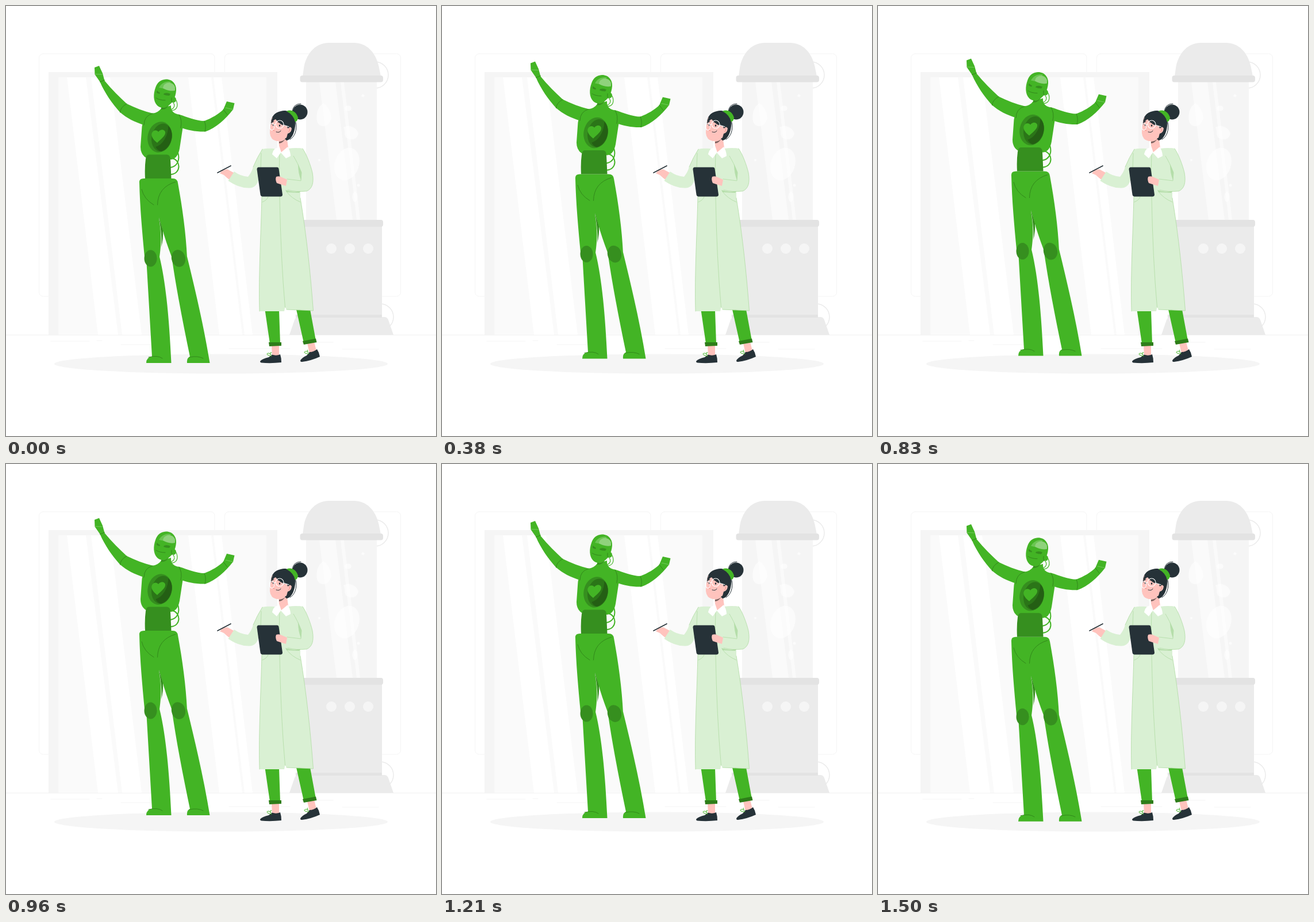
Recreate the animation shown at these times as an HTML page. Size 748 by 748 pixels, loop 1540 ms.

```html
<!DOCTYPE html>
<html lang="en">
<head>
<meta charset="utf-8">
<title>Robot and scientist</title>
<style>
  html, body { margin: 0; height: 100%; overflow: hidden; background: #fff; }
  svg { display: block; width: 100vw; height: 100vh; }
  .green { fill: #43b425; }
  .deep { fill: #368f1f; }
  .coat { fill: #d9f0d3; }
  .skin { fill: #ffc3bd; }
  .ink { fill: #263238; }
  .line { fill: none; stroke-linecap: round; stroke-linejoin: round; }
  .seam { stroke: #32881b; }
  .fold { stroke: #b0dba4; stroke-width: .8; }
  .cable { stroke: #43b425; }
</style>
</head>
<body>
<svg viewBox="0 0 748 748">
  <g id="room">
    <g class="line" stroke="#f5f5f5">
      <rect x="57.5" y="83" width="305.5" height="422" rx="7"/>
      <rect x="380.5" y="83" width="306" height="422" rx="7"/>
      <path d="M78 583H145M158 582H167M200 589H263M388 596H462M478 596H494M530 585H569M585 597H648"/>
    </g>
    <path class="line" stroke="#f0f0f0" d="M0 572.3H748"/>
    <path fill="#f5f5f5" d="M74 115H472V572H74Z"/>
    <path fill="#fafafa" d="M91 124H453V572H91Z"/>
    <path fill="#fff" d="M106 124H139L195 572H160ZM148 124H181L236 572H202ZM317 124H357L411 572H371ZM361 124H375L429 572H415Z"/>
    <ellipse cx="374" cy="622.5" rx="290" ry="17" fill="#f5f5f5"/>
  </g>

  <g id="tank">
    <g class="line" stroke="#ebebeb" stroke-width="1.5">
      <circle cx="642" cy="120" r="23"/>
      <circle cx="651" cy="541" r="23"/>
    </g>
    <path fill="#f5f5f5" d="M522 132H645V372H522Z"/>
    <path fill="#fafafa" d="M545 132H573L603 372H575ZM582 132H588L616 372H610Z"/>
    <g fill="#fff" opacity=".6">
      <path d="M552 169C560 174 568 189 565 198C561 209 551 212 544 206C537 198 540 176 552 169Z"/>
      <ellipse cx="595" cy="178" rx="6" ry="4.5"/>
      <path d="M587 211C598 206 610 211 613 222C611 232 601 235 592 229C587 224 591 217 587 211Z"/>
      <ellipse cx="593" cy="275" rx="21" ry="29" transform="rotate(18 593 275)"/>
      <ellipse cx="607" cy="332" rx="4.5" ry="9"/>
      <circle cx="613" cy="312" r="2.5"/>
      <circle cx="621" cy="156" r="2.5"/>
      <circle cx="545" cy="268" r="2"/>
    </g>
    <path fill="#ebebeb" d="M516 122L518.500 105C524 80 540 64 562 64H605C627 64 643 80 648.500 105L652 122ZM518 383H654V541H518ZM508 541H658Q663 541 665 546L674 572H493L502 546Q504 541 508 541Z"/>
    <g fill="#e3e3e3">
      <rect x="511.5" y="121" width="144.5" height="11.5" rx="4"/>
      <rect x="511.5" y="372" width="144.5" height="12" rx="4"/>
      <path d="M504 537H654V542H504Z"/>
    </g>
    <g fill="#f5f5f5">
      <circle cx="566" cy="422" r="9"/><circle cx="598" cy="422" r="9"/><circle cx="630" cy="422" r="9"/>
    </g>
  </g>

  <g id="robot">
    <path class="line cable" stroke-width="2" d="M290 265C304 269 305 291 287 293M299 255C303 268 298 279 286 281"/>
    <g class="green">
      <path d="M288 435L315 436C330 497 345 562 354.500 621H315Q314 612 320 610C309 557 297 497 288 435Z"/>
      <path d="M244 438L267 436C279 485 284 550 287.500 621H244Q244 611 254 610Z"/>
    </g>
    <path class="green" d="M232 308Q231 300 240 300H290Q298 300 299 308C307 352 313 395 315 438L288 436Q277 407 272 388L266 368C268 384 272 401 267 437L241 436C237 394 233 350 232 308Z"/>
    <path class="deep" d="M266 368L273 390Q274 404 270 420Q272 402 266 368Z"/>
    <ellipse class="deep" cx="251.5" cy="439" rx="11" ry="14.5"/>
    <ellipse class="deep" cx="300" cy="439" rx="12" ry="15" transform="rotate(-14 300 439)"/>
    <path class="line seam" d="M236 319Q240 336 257 346M263.500 346Q264 315 295 306M248 611Q264 607 272 613M319 611Q334 608 343 613"/>

    <path class="green" d="M253 187Q265 186 270 178L287 173Q286 187 302 189Q310 200 307 215L302 248Q299 265 288 267H250Q234 262 234 245L236.500 210Q239 193 253 187Z"/>
    <path class="deep" d="M248 258.500H280Q286 259 286 267L287.500 300H242Q241 281 243 266Q244 259 248 258.500Z"/>

    <path class="green" d="M154 107L162 104L168 117L171.500 130C184 145 197 158 210 170C224 177 240 183 256 187L240 207C224 202 210 195 198.500 185C185 170 172 152 163.500 132L154.500 119Z"/>
    <path class="green" d="M302 189C315 193 331 200 345 200C358 195 370 188 378 180L384 166L397.500 169L395 180C382 197 365 212 347 218.500C331 219 316 216 303 211Z"/>
    <path class="line seam" d="M210 170Q199 176 198.500 185M163.500 132L171.500 129M240 207Q240 191 255 187M345 200Q349 209 346 218M378 180L385 189M301 189Q307 198 304 212"/>
    <path class="line" stroke="#7fcf69" stroke-width=".8" d="M155 118.500L167 119M382 177L395 180"/>

    <g transform="rotate(12 267.5 228)">
      <ellipse class="deep" cx="267.5" cy="228" rx="21" ry="27"/>
      <ellipse cx="271" cy="228" rx="17.5" ry="24.5" fill="#2b7518"/>
      <path fill="#245f14" d="M278 206C292 214 292 242 275 252C270 252 266 249 264 246C276 240 281 222 278 206Z"/>
    </g>
    <path class="green" d="M263 238C254 231 251 224 255 219C258 215 263 216 265 219C269 214 275 214 277 219C278 226 271 230 263 238Z"/>

    <path class="deep" d="M270 176L284 171Q279 181 270 180Z"/>
    <path class="line cable" stroke-width="1.2" d="M296 164C300 173 298 182 287 182M291 168Q296 175 288 180"/>
    <path class="green" d="M278 127.500C289 127 297 136 296 147C295 160 289 169 283 173C277 179 268 178 263 173C256 166 256 153 260 142C263 133 269 128 278 127.500Z"/>
    <ellipse class="green" cx="291.5" cy="163" rx="4.5" ry="5"/>
    <path fill="#6bc553" d="M266 142C270 134 279 130 287 132L276 144Z"/>
    <path fill="#8fd27c" d="M274 139C278 132 290 131 294 141L294 147C287 149 278 146 273 143Z"/>
    <path class="deep" d="M262 147L268 151L267 153L262 151ZM275 152Q281 150 286 153L284 156Q278 156 274 154Z"/>
    <path class="line seam" d="M261 160Q267 164 277 164M288 160Q287 165 289 168"/>
  </g>

  <g id="scientist">
    <path class="skin" d="M462 590H475V609H463ZM524 587L536 584L540 600L528 604Z"/>
    <path class="green" d="M450.500 529H475L477 587H459ZM505 528H529L539 582L518 586Z"/>
    <path fill="#2e7d19" d="M457 585H479V591L458 592ZM516 583L539 578.500L540.500 585L518 589Z"/>
    <path class="ink" d="M442 618Q445 614 457 611L463 606.500Q470 609 477 606Q479 612 479 620Q461 622 444 620.500Q442 620 442 618ZM512 617Q514 612 523 608L528 602Q535 602 541 597Q545 603 546 610Q531 617 515 619Q512 619 512 617Z"/>
    <path class="line cable" d="M462 609Q454 608 454 605Q457 602 461 607Q458 601 462 603M527 605Q519 605 519 602Q522 599 526 603Q522 597 525 599"/>

    <path class="skin" d="M474 230L475 243L479 255L491 247L488 224Z"/>
    <path fill="#7b625f" d="M475 236Q483 235 486 231Q482 238 475 239Z"/>

    <path class="skin" d="M372 291Q376 284 385 284L398 291L391 304Q384 299 379 294Z"/>
    <path class="line" stroke="#263238" stroke-width="1.7" d="M368 290L391 278"/>

    <path class="coat" d="M446 249Q455 247 466 248L478 255L491 248Q505 246 516 248C523 258 530 277 533 290C536 307 533 318 523 322L512 323V334C523 400 530 470 534.500 530L488 528L485.500 524L484 531H441C439 466 444 390 445 331L443 287L440 300Q437 313 428 316Q408 319 386.500 304L397 288Q408 296 421 297Q427 290 430 280Q437 263 446 249Z"/>
    <path fill="#b5deaa" d="M508 275L514 289L513 303Q508 290 508 275ZM486 320Q499 325 512 322L510 325L488 324Z"/>
    <path class="line fold" d="M476 257Q474 295 476 333Q478 440 485.500 524M446 341Q454 338 456 332M488 323Q497 335 512 341M500 261Q507 272 514 290L513 304L489 301M516 248C523 258 530 277 533 290C536 307 533 318 523 322Q505 324 490 320M446 249Q437 263 430 280M444 256L443 283M441 531C439 466 444 390 445 331M512 334C523 400 530 470 534.500 530L488 528"/>
    <path fill="#fff" d="M463 258Q465 247 474 246L478 255L490 245Q495 253 495 261L487 265L478 255L471 265Z"/>

    <path class="ink" d="M439 280.500H472Q474 280.500 474.500 283L481 328Q481 331 478 331.500H446Q443 331 442.500 328L436.500 284Q436.500 281 439 280.500Z"/>
    <path class="skin" d="M470 297Q475 295 480 298L489 302L487 313L477 310L471 308Q468 302 470 297Z"/>

    <circle class="ink" cx="511.5" cy="184.5" r="13"/>
    <path class="line" stroke="#263238" d="M498 184Q499 170 513 170M504 202C507 216 502 228 494 232"/>
    <path class="ink" d="M461 207C460 192 468 185 478 183C492 179 503 189 503.500 203C503 218 498 232 488 234Z"/>
    <path class="skin" d="M463 194L479 200L490 210Q494 208 497 213Q496 221 490 222L488 229Q480 235 471 235Q460 233 459 221Q459 207 463 194Z"/>
    <path class="ink" d="M461 207C461 193 468 186 480 185Q496 188 500 207L490 213L489 209Q477 208 469 197Q465 198 461 207Z"/>
    <path class="green" d="M488 183C496 179 505 184 508 194Q508 199 503 202Q501 190 488 183Z"/>
    <path class="line" stroke="#f28f87" d="M468 207L464 216L467 217M493 213Q495 216 492 219"/>
    <g class="ink">
      <ellipse cx="465" cy="207" rx="1.2" ry="1.7"/><ellipse cx="476" cy="208" rx="1.3" ry="1.8"/>
    </g>
    <path class="line" stroke="#263238" d="M463 202L466 201M473 202Q477 200 480 204M470 219Q476 221 478 217"/>
    <g class="line" stroke="#fff" stroke-width="1.2">
      <circle cx="476" cy="206" r="7"/><ellipse cx="462.5" cy="210" rx="4" ry="6"/>
      <path d="M466 207L469 206M483 207L492 210"/>
    </g>
  </g>
</svg>
<script>
  const LOOP = 1540, STEPS = 37, RISE = 15.3;
  const robot = document.getElementById('robot');

  // Steady rise and fall at 24 steps a second; the low point is the last step.
  function draw(now) {
    const step = Math.floor((now % LOOP) / LOOP * STEPS + 0.12);
    const phase = (step + 1) % STEPS / STEPS;
    const lift = RISE * (1 - Math.abs(2 * phase - 1));
    robot.setAttribute('transform', `translate(0 ${(0.8 - lift).toFixed(2)})`);
  }

  const start = performance.now();
  function tick() {
    draw(performance.now() - start);
    requestAnimationFrame(tick);
  }
  tick();
</script>
</body>
</html>
```
